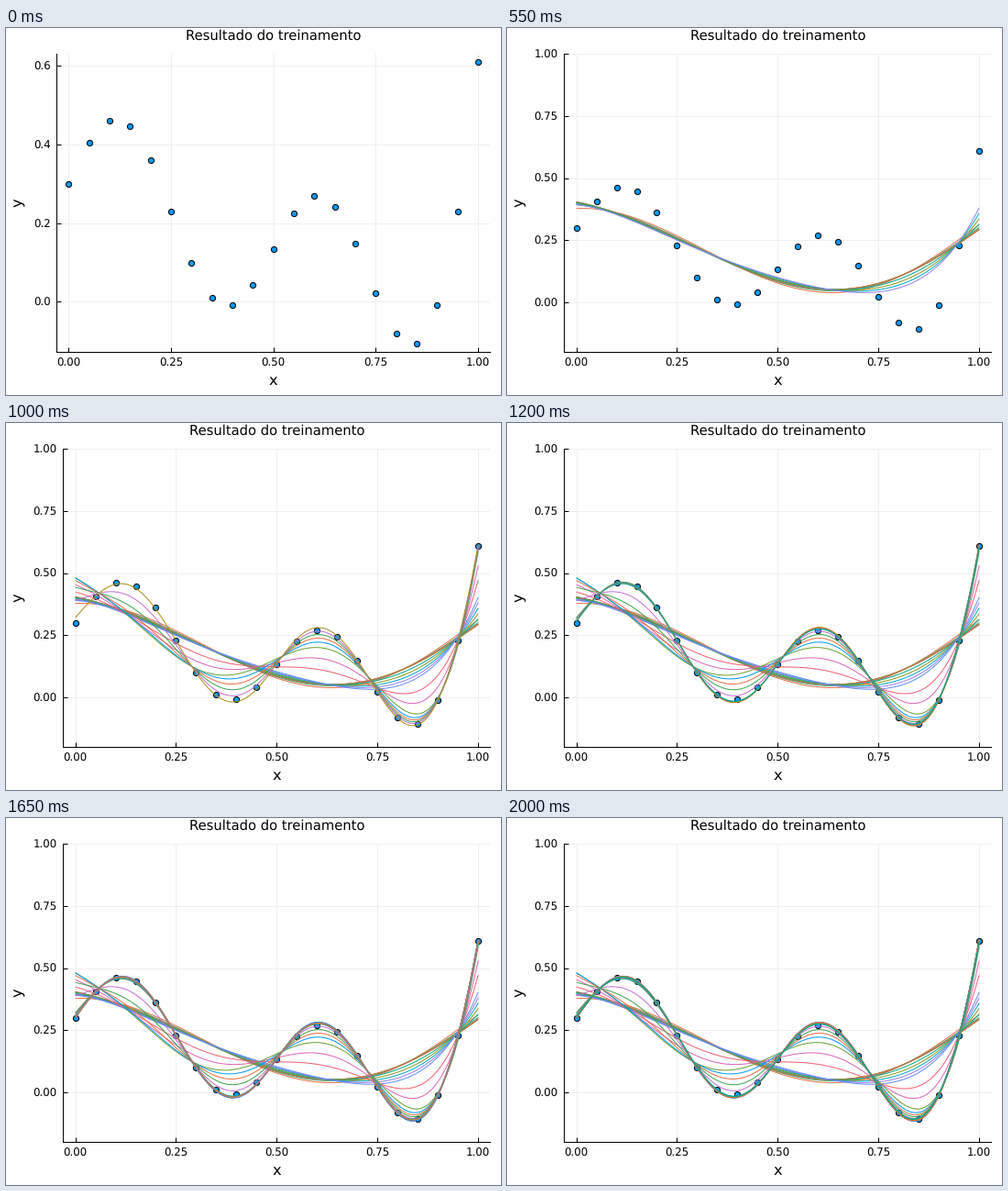
Write a matplotlib script that moves like this. It is 540 by 400 pixels and loops after 2050 ms.

```python
import numpy as np
import matplotlib.pyplot as plt
from matplotlib.animation import FuncAnimation
from matplotlib.transforms import IdentityTransform
from numpy.polynomial import Polynomial

W, H, DPI = 540, 400, 100
PT = 72 / DPI  # points per pixel
CURVES = 40

plt.rcParams["font.family"] = "DejaVu Sans"
plt.rcParams["text.hinting"] = "none"

PALETTE = ["#009afa", "#e36f47", "#3ea44e", "#c371d2", "#ac8e18", "#00aaae",
           "#ed5e93", "#c68225", "#00a98d", "#8e971e", "#00a9cc", "#9b7fe9",
           "#618df6", "#f06073", "#dd65b6", "#6c9f33"]

COARSE = [0, .25, .5, .7, .85, 1]
FINE = [0, .1, .25, .4, .6, .75, .85, .95, 1]


def through(knots, values):
    """Polynomial passing through a few key points."""
    return Polynomial.fit(knots, values, len(knots) - 1)


trend = through(FINE, [.3, .272, .231, .182, .079, .023, .0835, .3486, .61])


def signal(t):
    return trend(t) + .2 * np.sin(4 * np.pi * t)


x = np.linspace(0, 1, 21)
y = signal(x)

# Shapes the model passes through while it learns
xs = np.linspace(0, 1, 201)
first = through(COARSE, [.378, .268, .078, .049, .145, .312])(xs)
flat = through(COARSE, [.405, .257, .087, .060, .141, .293])(xs)
bent = through(COARSE, [.390, .249, .104, .035, .080, .403])(xs)
half = through(FINE, [.482, .37, .165, .094, .201, .045, -.066, .21, .587])(xs)
fitted = signal(xs) + .016 * np.sin(5 * np.pi * (xs - .5)) * np.exp(-((xs - .5) / .14) ** 2)
lag = (1 - xs) ** 3  # the left side learns last


def mix(a, b, t):
    return a + (b - a) * t


def curve(k):
    """Model output after training step k (1-based)."""
    if k <= 7:
        return mix(flat, first, .45 ** (k - 1))
    if k <= 12:
        return mix(flat, bent, (k - 7) / 5)
    if k <= 15:
        return mix(bent, half, ((k - 12) / 3) ** .9)
    if k < 20:
        return mix(half, fitted, ((k - 15) / 5) ** (.65 + 2.35 * lag))
    wobble = .015 * np.sin(2 * k) * (fitted - flat)
    return mix(fitted, half, .12 * .7 ** (k - 20) * lag) + wobble


fig = plt.figure(figsize=(W / DPI, H / DPI), dpi=DPI, facecolor="white")


def make_axes(left, ylim, yticks, yfmt):
    right, top, bottom = 528.3, 28, 353.4
    ax = fig.add_axes([left / W, 1 - bottom / H, (right - left) / W, (bottom - top) / H])
    ax.set(xlim=(-.03, 1.03), ylim=ylim)
    xticks = np.linspace(0, 1, 5)
    ax.set_xticks(xticks, [f"{v:.2f}" for v in xticks])
    ax.set_yticks(yticks, [format(v, yfmt) for v in yticks])
    ax.tick_params(direction="in", length=5 * PT, width=PT, pad=6.5 * PT,
                   labelsize=11.75 * PT)
    ax.spines[["top", "right"]].set_visible(False)
    ax.spines[["left", "bottom"]].set_linewidth(PT)
    ax.grid(color="#efefef", lw=PT)
    ax.set_axisbelow(True)

    def label(px, py, text, size, **kw):
        ax.text(px, H - py, text, fontsize=size * PT, ha="center", va="baseline",
                transform=IdentityTransform(), **kw)

    mid = (left + right) / 2
    label(mid, 12.8, "Resultado do treinamento", 14.8)
    label(mid, 388.6, "x", 16.2)
    label(17.8, 190.5, "y", 16.2, rotation=90, rotation_mode="anchor")
    ax.scatter(x, y, s=(6.2 * PT) ** 2, c=PALETTE[0], edgecolors="black",
               linewidths=PT, zorder=3, clip_on=False)
    return ax


margin = .03 * np.ptp(y)
start_ax = make_axes(55.1, (y.min() - margin, y.max() + margin), np.arange(4) * .2, ".1f")
train_ax = make_axes(62.4, (-.2, 1), np.linspace(0, 1, 5), ".2f")
lines = [train_ax.plot(xs, curve(k), color=PALETTE[k % 16], lw=PT, zorder=4,
                       solid_capstyle="butt")[0]
         for k in range(1, CURVES + 1)]


def update(i):
    start_ax.set_visible(i == 0)
    train_ax.set_visible(i > 0)
    for k, line in enumerate(lines, 1):
        line.set_visible(k <= i)
    return lines


anim = FuncAnimation(fig, update, frames=CURVES + 1, interval=50,
                     repeat=True, repeat_delay=0, blit=False)
plt.show()
```
